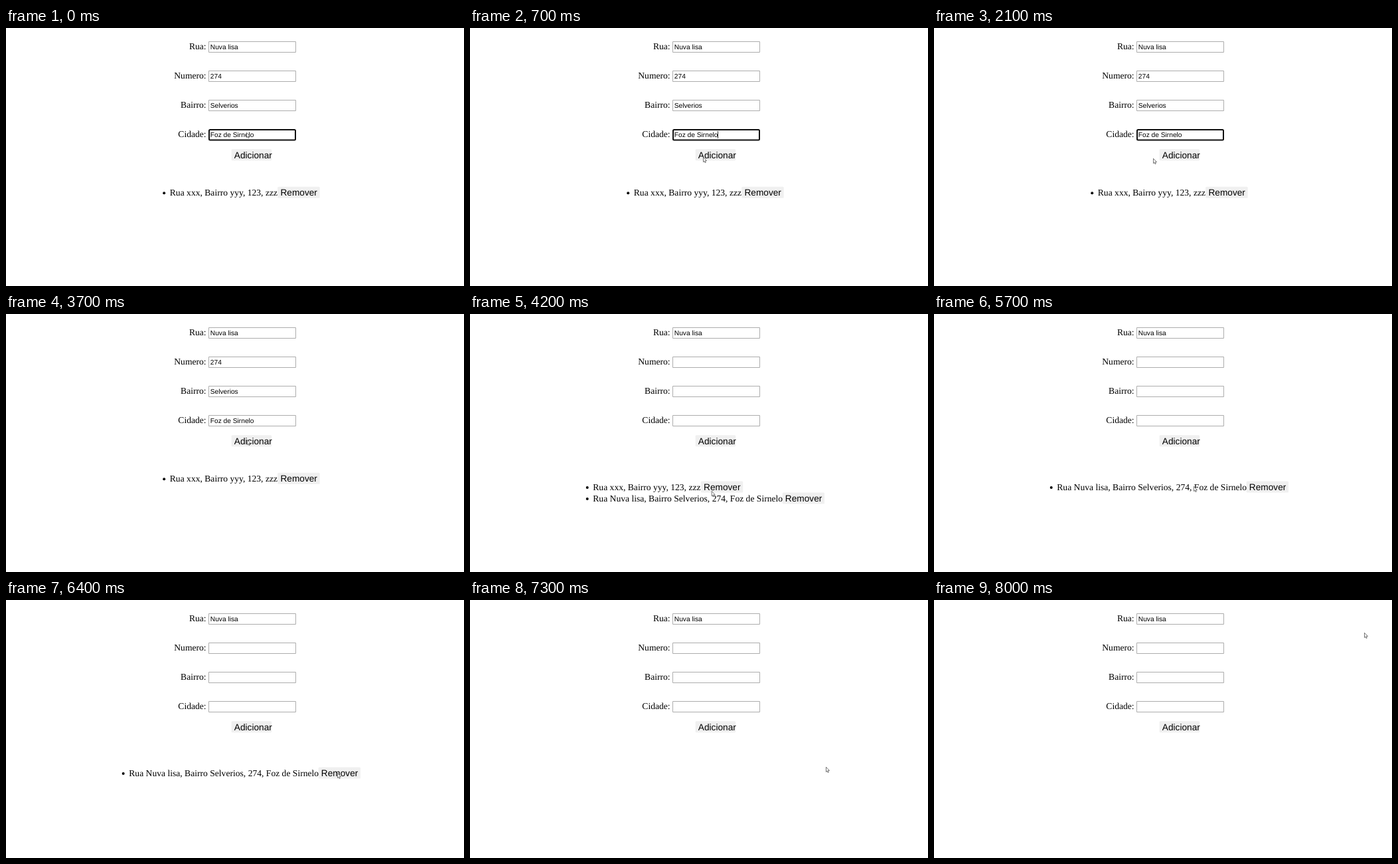
These frames come from a looping animation (690 by 388 pixels, 8.2 s). An HTML page with a canvas:

```html
<!DOCTYPE html>
<html lang="pt">
<head>
<meta charset="utf-8">
<style>
  html, body { margin: 0; width: 100%; height: 100%; overflow: hidden; background: #fff; }
  canvas { display: block; }
</style>
</head>
<body>
<canvas id="stage" width="690" height="388"></canvas>
<script>
const ctx = document.getElementById('stage').getContext('2d');
ctx.textRendering = 'geometricPrecision';

const LOOP = 8200, STEP = 100;
const BLUR = 3600, ADD = 3800, REMOVE_FIRST = 5700, REMOVE_LAST = 7200;
const SERIF = '13.6px "Liberation Serif", serif';
const SANS = '13.7px "Liberation Sans", sans-serif';
const SMALL = '10.2px "Liberation Sans", sans-serif';

const fields = [
  ['Rua:', 'Nuva lisa'],
  ['Numero:', '274'],
  ['Bairro:', 'Selverios'],
  ['Cidade:', 'Foz de Sirnelo'],
];
const sample = 'Rua xxx, Bairro yyy, 123, zzz';
const added = 'Rua Nuva lisa, Bairro Selverios, 274, Foz de Sirnelo';

const arrow = new Path2D('M.5 .3v7.3l1.6-1.4 1 2.4 1.2-.5-1-2.4 2.2-.1z');
const home = [362, 157];

// Pointer moves: start, end, target x, target y, sideways bow x, bow y
const moves = [
  [0, 500, 351, 194, 122, -60],
  [700, 1100, 340, 194, 133],
  [1100, 1600, 330, 196, -36],
  [2500, 2800, 430, 40, -110, -20],
  [2800, 3100, 363, 189, 55, 110],
  [3900, 4400, 364, 308],
  [4500, 5200, 391, 259],
  [5800, 6100, 330, 158, -130, 85],
  [6100, 6400, 499, 260, 100, -20],
  [7200, 8000, 648, 49, 80],
];

function pointerAt(t) {
  let [x, y] = home;
  for (const [start, end, toX, toY, bowX = 0, bowY = 0] of moves) {
    if (t <= start) break;
    const k = Math.min(1, (t - start) / (end - start));
    const ease = k * k * (3 - 2 * k), bow = Math.sin(Math.PI * k);
    x += (toX - x) * ease + bowX * bow;
    y += (toY - y) * ease + bowY * bow;
  }
  return [x, y];
}

function text(value, x, y, font, align = 'left') {
  ctx.font = font;
  ctx.textAlign = align;
  ctx.fillStyle = '#000';
  ctx.fillText(value, x, y);
}

function button(label, x, y, width) {
  ctx.fillStyle = '#f0f0f0';
  ctx.beginPath();
  ctx.roundRect(x, y, width, 17, 1.5);
  ctx.fill();
  text(label, x + 4.2, y + 13.2, SANS);
}

function field(label, value, y, focused) {
  text(label, 301.6, y + 12, SERIF, 'right');
  ctx.strokeStyle = focused ? '#101010' : '#adadad';
  ctx.lineWidth = focused ? 2 : 1;
  ctx.beginPath();
  if (focused) ctx.roundRect(306, y + 1, 130, 15.5, 1.5);
  else ctx.rect(305.5, y + .5, 131, 16);
  ctx.stroke();
  text(value, 307.8, y + 12, SMALL);
}

function item(value, x, y, buttonX) {
  ctx.fillStyle = '#000';
  ctx.beginPath();
  ctx.arc(x - 8.6, y - 3.7, 2, 0, 7);
  ctx.fill();
  button('Remover', buttonX, y - 13.2, 63.5);
  text(value, x, y, SERIF);
}

function pointer(x, y) {
  ctx.save();
  ctx.translate(x, y);
  ctx.fillStyle = '#fff';
  ctx.fill(arrow);
  ctx.strokeStyle = '#555';
  ctx.lineWidth = .8;
  ctx.stroke(arrow);
  ctx.restore();
}

function draw(t) {
  ctx.fillStyle = '#fff';
  ctx.fillRect(0, 0, 690, 388);

  fields.forEach(([label, value], i) =>
    field(label, i && t >= ADD ? '' : value, 20 + 44 * i, i === 3 && t < BLUR));
  if (t < BLUR && (t + 100) % 1100 >= 500) {
    ctx.fillStyle = '#333';
    ctx.fillRect(373, 155, 1, 11);
  }
  button('Adicionar', 339.6, 182.3, 60.6);

  if (t < ADD) {
    item(sample, 246.8, 252, 409.2);
  } else if (t < REMOVE_FIRST) {
    item(sample, 185.3, 264.6, 347.8);
    item(added, 185.3, 281.8, 470.6);
  } else if (t < REMOVE_LAST) {
    item(added, 185.3, 264.6, 470.6);
  }
  pointer(...pointerAt(t));
}

function tick() {
  const t = performance.now() % LOOP;
  draw(Math.floor(t / STEP) * STEP);
  requestAnimationFrame(tick);
}
tick();
</script>
</body>
</html>
```
